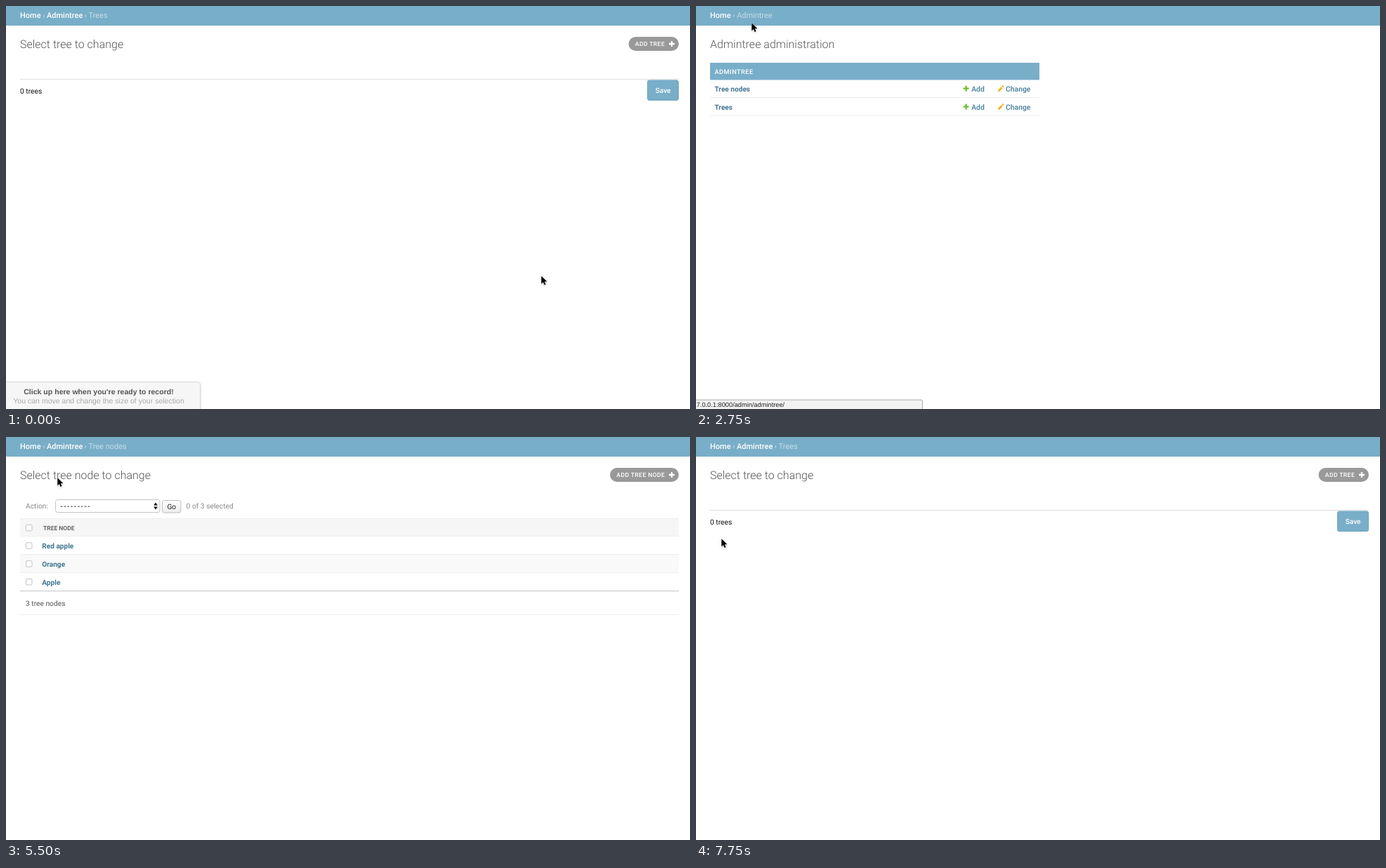
These frames come from a looping animation (974 px wide and 575 px high, 8000 ms). An HTML page:

```html
<!DOCTYPE html>
<html lang="en">
<head>
<meta charset="utf-8">
<title>Tree admin</title>
<style>
  html, body { margin: 0; width: 100%; height: 100%; overflow: hidden; background: #fff; }
  svg { display: block; width: 974px; height: 575px; }
  text { font: 10.25px Roboto, sans-serif; text-rendering: geometricPrecision; white-space: pre; }
  .crumb { font-size: 11px; fill: #c4dce8; }
  .strong { font-weight: 500; fill: #fff; }
  .hover { fill: #c4dce8; text-decoration: underline; }
  .title { font-size: 16px; font-weight: 300; fill: #555; }
  .pill { font-size: 8.6px; font-weight: 500; letter-spacing: .4px; fill: #fff; }
  .caption { font-size: 9.2px; font-weight: 500; letter-spacing: .5px; fill: #fff; }
  .link { font-size: 10.1px; font-weight: 700; fill: #417690; }
  .link.hover { fill: #036; }
  .tool { font-size: 10.4px; font-weight: 500; fill: #447e9b; }
  .muted { fill: #888; }
  .head { font-size: 8.5px; font-weight: 700; fill: #666; }
  .save { font-size: 10.1px; font-weight: 500; fill: #fff; }
  .dashes { font: 10.5px "DejaVu Sans", sans-serif; letter-spacing: 1.1px; fill: #111; }
  .url { font: 9.25px "Liberation Sans", Arial, sans-serif; fill: #222; }
  .hint { font: 10.55px "Liberation Sans", Arial, sans-serif; fill: #aaa; }
  .hint.bold { font-weight: 700; fill: #555; }
</style>
</head>
<body>
<svg viewBox="0 0 974 575">
  <defs>
    <linearGradient id="button" x2="0" y2="1">
      <stop stop-color="#fff"/><stop offset="1" stop-color="#ececec"/>
    </linearGradient>
    <filter id="shadow" x="-20%" y="-30%" width="140%" height="160%">
      <feDropShadow dx="0" dy="1" stdDeviation="1.5" flood-opacity=".22"/>
    </filter>
  </defs>
  <rect width="974" height="575" fill="#fff"/>
  <rect width="974" height="28" fill="#79aec8"/>
  <g id="pages"></g>

  <g id="hint">
    <rect x="-10" y="536.5" width="286.5" height="60" rx="4" fill="#f6f6f6" stroke="#ddd" filter="url(#shadow)"/>
    <text class="hint bold" x="132" y="554" text-anchor="middle">Click up here when you're ready to record!</text>
    <text class="hint" x="132" y="567" text-anchor="middle">You can move and change the size of your selection</text>
  </g>

  <g id="status">
    <rect x="-5" y="562" width="327.5" height="20" rx="2" fill="#f2f2f2" stroke="#aaa"/>
    <text id="url" class="url" x="-9.6" y="572"></text>
  </g>

  <path id="cursor" d="M0 0V11.2L2.6 8.8L4.3 12.8L6.3 11.9L4.6 8H8.2Z" fill="#000"
        stroke="#fff" stroke-width="1" paint-order="stroke" filter="url(#shadow)"/>
</svg>

<script>
const $ = id => document.getElementById(id);
const text = (x, y, cls, s, extra = '') => `<text x="${x}" y="${y}" class="${cls}" ${extra}>${s}</text>`;
const box = (x, y, w, h, fill, extra = '') =>
  `<rect x="${x}" y="${y}" width="${w}" height="${h}" fill="${fill}" ${extra}/>`;
const plus = (x, y, color) =>
  `<path d="M${x - 4} ${y}h8M${x} ${y - 4}v8" stroke="${color}" stroke-width="2.3"/>`;
const pencil = y =>
  `<path d="M429.6 ${y + 4.3}l.8-2.9 4.2-4.2 2.1 2.1-4.2 4.2zM435.3 ${y - 3.5}l1-1q.6-.4 1.1 0l.9.9q.5.6 0 1.1l-1 1z" fill="#f0b429"/>`;

const crumbs = last =>
  text(20, 17.4, 'crumb strong', 'Home') + text(52.3, 17.4, 'crumb', '›') +
  (last
    ? text(58, 17.4, 'crumb strong', 'Admintree', 'data-link="app"') +
      text(111.6, 17.4, 'crumb', '›') + text(117.5, 17.4, 'crumb', last)
    : text(58, 17.4, 'crumb', 'Admintree'));

const addPill = (x, label) =>
  box(x, 44, 958 - x, 20, '#999', 'rx="10"') + text(x + 9.3, 57.1, 'pill', label) + plus(948, 54, '#fff');

const treesPage = () =>
  crumbs('Trees') + text(20, 60, 'title', 'Select tree to change') + addPill(886.5, 'ADD TREE') +
  box(20, 104, 938, 1, '#ddd') + text(20, 125, '', '0 trees', 'fill="#111"') +
  box(913.5, 106, 44, 28.5, '#79aec8', 'rx="2.5" stroke="#6fa5c0"') +
  text(935.6, 124, 'save', 'Save', 'text-anchor="middle"');

const modelRow = (y, name, link) =>
  text(26.4, y + 4, 'link', name, `data-link="${link}"`) +
  plus(384.6, y - .3, '#70bf2b') + text(392.2, y + 4, 'tool', 'Add') +
  pencil(y) + text(441, y + 4, 'tool', 'Change') +
  box(20, y + 12, 469, 1, '#eee');

const appPage = () =>
  crumbs() + text(20, 60, 'title', 'Admintree administration') +
  box(20, 81, 469, 24.5, '#79aec8') + text(26.4, 96.8, 'caption', 'ADMINTREE') +
  modelRow(118, 'Tree nodes', 'treenode') + modelRow(144, 'Trees', 'tree');

const check = y => box(28.5, y - 4.5, 8.5, 8.5, '#fff', 'rx="1.5" stroke="#bbb" stroke-width=".9"');
const nodeRow = (y, name) => check(y) + text(51.3, y + 3.8, 'link', name);

const nodesPage = () =>
  crumbs('Tree nodes') + text(20, 60, 'title', 'Select tree node to change') + addPill(860, 'ADD TREE NODE') +
  text(28, 102, 'muted', 'Action:') +
  box(70.5, 89.5, 148.5, 18, '#fff', 'rx="3" stroke="#c4c4c4"') + text(77, 101.6, 'dashes', '-'.repeat(9)) +
  '<path d="M210.2 97.4l2.9-4 2.9 4zM210.2 99.6l2.9 4 2.9-4z" fill="#111"/>' +
  box(222.5, 90.5, 26.5, 17.5, 'url(#button)', 'rx="3" stroke="#bcbcbc"') +
  text(235.8, 102.6, '', 'Go', 'text-anchor="middle" fill="#222"') +
  text(256.6, 102, 'muted', '0 of 3 selected') +
  box(20, 116, 938, 26, '#eee') + box(20, 117, 938, 24, '#f6f6f6') +
  check(129.8) + text(53, 132.7, 'head', 'TREE NODE') +
  box(20, 167, 938, 27, '#eee') + box(20, 168, 938, 25, '#f9f9f9') +
  nodeRow(155.3, 'Red apple') + nodeRow(181.2, 'Orange') + nodeRow(207, 'Apple') +
  box(20, 219, 938, 1.3, '#d0d0d0') +
  text(28, 241, '', '3 tree nodes', 'fill="#555"') + box(20, 253, 938, 1, '#eee');

$('pages').innerHTML = Object.entries({ trees: treesPage, app: appPage, nodes: nodesPage })
  .map(([name, draw]) => `<g id="${name}">${draw()}</g>`).join('');

// All tracks hold their value from the given time in ms.
const TICK = 250, LOOP = 8000;
const pages = [[0, 'trees'], [2750, 'app'], [4000, 'nodes'], [6500, 'app'], [7500, 'trees']];
const hovers = [[0, ''], [1750, 'app'], [2750, ''], [3250, 'treenode'], [4000, ''],
  [5750, 'app'], [6500, ''], [7250, 'tree'], [7500, '']];
const urls = [[0, '', 0], [1750, '', 1], [3000, '', 0], [3250, 'treenode/', 1], [4000, 'treenode/', .14],
  [4250, '', 0], [5750, '', 1], [6750, '', 0], [7250, 'tree/', 1], [7750, '', 0]];
const moves = [[0, 762, 385], [250, 738, 354], [500, 570, 236], [750, 300, 112], [1000, 134, 46],
  [1250, 85, 24], [1750, 83, 17], [2000, 82, 18], [2250, 81, 19], [2750, 79, 24], [3000, 65, 72],
  [3250, 46, 115], [3500, 42, 121], [4250, 44, 134], [4500, 54, 166], [4750, 70, 192], [5000, 80, 198],
  [5250, 77, 136], [5500, 73, 58], [5750, 72, 19], [6000, 73, 14], [6250, 74, 16], [6500, 74, 37],
  [6750, 62, 82], [7000, 44, 128], [7250, 36, 145]];

const at = (track, t) => track.findLast(key => key[0] <= t);
const show = (el, on) => { el.style.display = on ? '' : 'none'; };

function render(now) {
  const t = Math.floor(now % LOOP / TICK) * TICK;
  const page = at(pages, t)[1], hover = at(hovers, t)[1];
  const [, path, alpha] = at(urls, t), [, x, y] = at(moves, t);
  for (const g of $('pages').children) show(g, g.id === page);
  for (const el of document.querySelectorAll('[data-link]')) el.classList.toggle('hover', el.dataset.link === hover);
  show($('hint'), t < TICK);
  $('status').style.opacity = alpha;
  $('url').textContent = '127.0.0.1:8000/admin/admintree/' + path;
  $('cursor').setAttribute('transform', `translate(${x + .3} ${y + .3})`);
}

const start = performance.now();
function loop() {
  render(performance.now() - start);
  requestAnimationFrame(loop);
}
loop();
</script>
</body>
</html>
```
